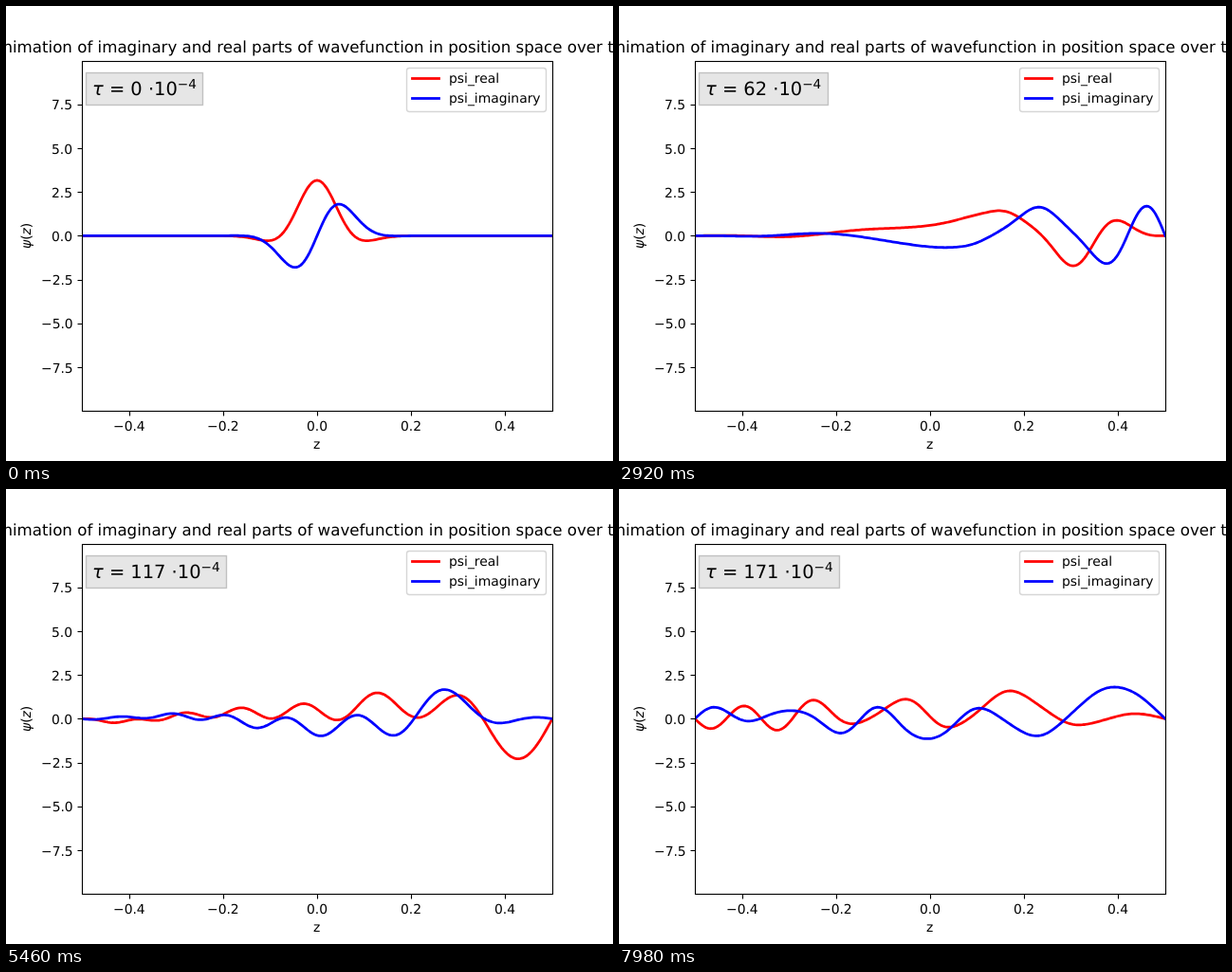
These frames come from a looping animation (640x480 px, 8 s). An HTML page with a canvas:

```html
<!DOCTYPE html>
<html lang="en">
<head>
<meta charset="utf-8">
<title>Wavefunction in a box</title>
<style>
html, body { margin: 0; width: 100%; height: 100%; overflow: hidden; background: #fff; }
canvas { display: block; }
</style>
</head>
<body>
<canvas id="stage" width="640" height="480"></canvas>
<script>
const ctx = document.getElementById('stage').getContext('2d');
ctx.textRendering = 'geometricPrecision';
const PT = 100 / 72;
const LOOP = 8000;
const LEFT = 80, RIGHT = 576, TOP = 57.6, BOTTOM = 427.2;
const toX = z => 328 + 496 * z;
const toY = v => 242.4 - 18.48 * v;
const snap = v => Math.floor(v + 0.5) + 0.5;

// Gaussian packet exp(-A z^2 + i K z), expanded in the sine modes of a unit box.
// Each mode turns as in a Crank-Nicolson scheme on a grid of CELLS cells.
const A = 50 * Math.PI, K = 20, MODES = 45;
const CELLS = 250, DT = 1e-4;
const NORM = 2 * Math.pow(2 * A / Math.PI, 0.25) * Math.sqrt(Math.PI / A);
const modes = Array.from({ length: MODES }, (_, i) => {
  const q = (i + 1) * Math.PI;
  const plus = Math.exp(-((K + q) ** 2) / (4 * A));
  const minus = Math.exp(-((K - q) ** 2) / (4 * A));
  const energy = 2 * CELLS ** 2 * (1 - Math.cos(q / CELLS));
  return {
    q,
    turn: 2 * Math.atan(energy * DT / 2),
    re: NORM * Math.sin(q / 2) * (plus + minus) / 2,
    im: NORM * Math.cos(q / 2) * (minus - plus) / 2
  };
});

function wave(step) {
  const turned = modes.map(({ q, turn, re, im }) => {
    const c = Math.cos(turn * step), s = Math.sin(turn * step);
    return { q, re: re * c + im * s, im: im * c - re * s };
  });
  const real = [], imag = [];
  for (let i = 0; i <= CELLS; i++) {
    let re = 0, im = 0;
    for (const m of turned) {
      const s = Math.sin(m.q * i / CELLS);
      re += m.re * s;
      im += m.im * s;
    }
    const x = toX(i / CELLS - 0.5);
    real.push([x, toY(re)]);
    imag.push([x, toY(im)]);
  }
  return { real, imag };
}

function line(points, color, width, cap = 'butt') {
  ctx.beginPath();
  points.forEach(([x, y]) => ctx.lineTo(x, y));
  ctx.strokeStyle = color;
  ctx.lineWidth = width * PT;
  ctx.lineCap = cap;
  ctx.lineJoin = 'round';
  ctx.stroke();
}

// Draws text and returns the x where it ends
function text(str, x, y, size = 10, align = 0, style = 'normal') {
  ctx.font = `${style} ${size * PT}px "DejaVu Sans", sans-serif`;
  ctx.fillStyle = '#000';
  const w = ctx.measureText(str).width;
  ctx.fillText(str, align ? Math.round(x - w * align) : x, y);
  return x + w;
}

function drawCurves(step) {
  const { real, imag } = wave(step);
  ctx.save();
  ctx.beginPath();
  ctx.rect(LEFT, TOP, RIGHT - LEFT, BOTTOM - TOP);
  ctx.clip();
  line(real, '#f00', 2, 'square');
  line(imag, '#00f', 2, 'square');
  ctx.restore();
}

function drawAxes() {
  const label = v => v.toFixed(1).replace('-', '\u2212');
  for (let i = -2; i <= 2; i++) {
    const x = toX(i * 0.2);
    line([[snap(x), 427.5], [snap(x), 432.5]], '#000', 0.8);
    text(label(i * 0.2), x, 448, 10, 0.5);
  }
  for (let i = -3; i <= 3; i++) {
    const y = toY(i * 2.5);
    line([[75.5, snap(y)], [80.5, snap(y)]], '#000', 0.8);
    text(label(i * 2.5), 70.28, Math.round(y + 5.5), 10, 1);
  }
  ctx.strokeStyle = '#000';
  ctx.lineWidth = 0.8 * PT;
  ctx.lineJoin = 'miter';
  ctx.strokeRect(snap(LEFT), snap(TOP), RIGHT - LEFT, snap(BOTTOM) - snap(TOP));

  text('Animation of imaginary and real parts of wavefunction in position space over time',
    328, 49, 12, 0.5);
  text('z', 328, 467, 10, 0.5);

  ctx.save();
  ctx.translate(26, 256);
  ctx.rotate(-Math.PI / 2);
  let x = text('\u03c8', 0, 0, 10, 0, 'italic');
  x = text('(', x, 0);
  x = text('z', x, 0, 10, 0, 'italic');
  text(')', x, 0);
  ctx.restore();
}

function drawClock(step) {
  let x = text('\u03c4', 91, 94, 14, 0, 'italic');
  x = text(` = ${step} `, x, 94, 14);
  x = text('\u22c510', x, 94, 14);
  x = text('\u22124', x, 87, 9.8);
  const w = Math.floor(x + 5 * PT) + 0.5 - 84.5;
  // The tinted box goes behind the text
  ctx.save();
  ctx.globalCompositeOperation = 'multiply';
  ctx.fillStyle = 'rgba(128,128,128,0.2)';
  ctx.fillRect(84.5, 70.5, w, 34);
  ctx.strokeStyle = 'rgba(0,0,0,0.2)';
  ctx.lineWidth = PT;
  ctx.lineJoin = 'miter';
  ctx.strokeRect(84.5, 70.5, w, 34);
  ctx.restore();
}

function drawLegend() {
  ctx.beginPath();
  ctx.roundRect(422.5, 65.5, 147, 46, 2.78);
  ctx.fillStyle = 'rgba(255,255,255,0.8)';
  ctx.fill();
  ctx.strokeStyle = 'rgba(204,204,204,0.8)';
  ctx.lineWidth = PT;
  ctx.stroke();
  [['psi_real', '#f00', 76.5, 81], ['psi_imaginary', '#00f', 97.5, 102]].forEach(([name, color, y, base]) => {
    line([[428.5, y], [456.5, y]], color, 2, 'square');
    text(name, 467, base);
  });
}

// Three steps every 140 ms, the middle one held longest
function stepAt(ms) {
  const rest = ms % 140;
  return Math.floor(ms / 140) * 3 + (rest < 20 ? 0 : rest < 120 ? 1 : 2);
}

function draw(step) {
  ctx.fillStyle = '#fff';
  ctx.fillRect(0, 0, 640, 480);
  drawCurves(step);
  drawAxes();
  drawClock(step);
  drawLegend();
}

let start = null, shown = -1;
function tick() {
  const now = performance.now();
  if (start === null) start = now;
  const step = stepAt((now - start) % LOOP);
  if (step !== shown) draw(shown = step);
  requestAnimationFrame(tick);
}
tick();
</script>
</body>
</html>
```
